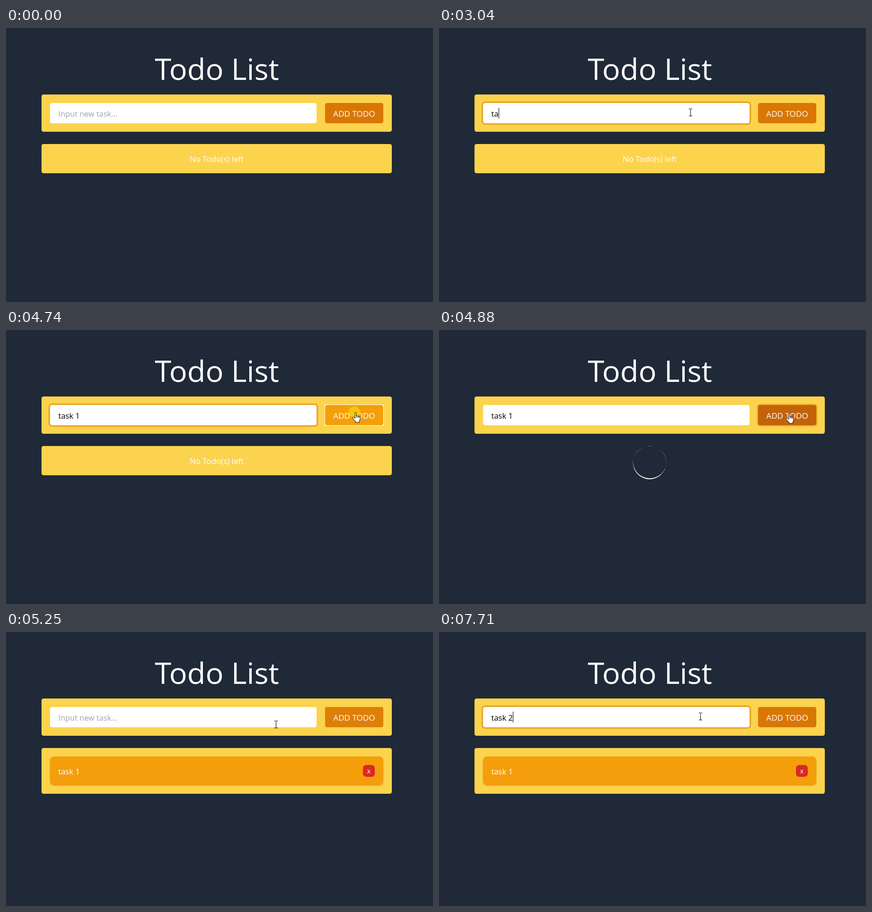
Write an HTML page with a canvas that moves like this. It is 902 by 581 pixels and loops after 8000 ms.

```html
<!DOCTYPE html>
<html lang="en">
<head>
<meta charset="utf-8">
<title>Todo List</title>
<style>
  html, body { margin: 0; width: 902px; height: 581px; overflow: hidden; background: #1f2937; }
  canvas { display: block; }
</style>
</head>
<body>
<canvas id="stage" width="902" height="581"></canvas>
<script>
const ctx = document.getElementById('stage').getContext('2d');
const LOOP = 8000;
const FOCUS = 1370, PRESS = 4735, RELEASE = 4845, LOADED = 5050, REFOCUS = 5660;
const HOVER = 4532, LEAVE = 5172;
const FIRST_KEYS = [2840, 3040, 3110, 3280, 3480, 3950];
const SECOND_KEYS = [6540, 6840, 6910, 7080, 7380, 7710];
const CARET_ON = [[FOCUS, 1910], [2440, 4450], [REFOCUS, 6170], [6540, LOOP]];
const CLICKS = [[FOCUS, 1480], [PRESS, RELEASE], [REFOCUS, 5755]];

// [time, x, y] of the pointer hotspot
const POINTER = [
  [160, 833, 566], [250, 800, 500], [360, 780, 462], [590, 780, 462],
  [760, 650, 375], [900, 528, 298], [980, 499, 232], [1040, 512, 190],
  [1100, 531, 179], [4280, 531, 179], [4480, 640, 176], [4600, 718, 172],
  [4720, 736, 174], [4845, 736, 174], [4880, 737, 176], [5110, 737, 176],
  [5180, 668, 191], [5250, 570, 196], [5330, 553, 192], [5500, 552, 179]
];

const INPUT = [93, 159, 563, 43], BUTTON = [674, 159, 123, 43];
const ARROW = new Path2D('M.5 .5V16.5L4.2 13L6.8 18.5L9 17.5L6.5 12H11.7Z');
const HAND = new Path2D('M1 13V2a1.5 1.5 0 0 1 3 0V8q1.5-1 3 .5q1.6-.8 2.6.7q2-.4 2.4 1.3V15q0 2-1.5 4V22H2.5V20Q-1 16.5-4 12.5Q-4.5 10.5-2.5 10.5Q-1 11 1 13.5Z');
const KNUCKLES = new Path2D('M4 8v4M7 8.5v3.5M9.6 9.2v3');

const within = (t, [from, to]) => t >= from && t < to;
const inside = (x, y, [left, top, w, h]) => x >= left && x < left + w && y >= top && y < top + h;

// cubic-bezier(.4, 0, .2, 1) over 150 ms
function fade(t, start) {
  const p = Math.min(1, Math.max(0, (t - start) / 150));
  let lo = 0, hi = 1;
  for (let i = 0; i < 16; i++) {
    const u = (lo + hi) / 2, v = 1 - u;
    if (1.2 * v * v * u + .6 * v * u * u + u ** 3 < p) lo = u; else hi = u;
  }
  return p === 0 ? 0 : p === 1 ? 1 : lo * lo * (3 - 2 * lo);
}

function box([x, y, w, h], color, radius = 4.4) {
  ctx.fillStyle = color;
  ctx.beginPath();
  ctx.roundRect(x, y, w, h, radius);
  ctx.fill();
}

function ring([x, y, w, h], amount) {
  const s = 3.3 * amount;
  if (s > 0) box([x - s, y - s, w + 2 * s, h + 2 * s], `rgba(217,119,6,${.5 * amount})`, 4.4 + s);
}

function text(str, x, y, size, color = '#fff', align = 'center') {
  ctx.font = `${size}px "Open Sans", "Noto Sans", sans-serif`;
  ctx.textAlign = align;
  ctx.fillStyle = color;
  ctx.fillText(str, x, y);
}

function buttonColor(t) {
  const steps = [[HOVER, [245, 158, 11]], [PRESS, [180, 83, 9]], [RELEASE, [245, 158, 11]], [LEAVE, [217, 119, 6]]];
  const mixed = steps.reduce((color, [start, to]) => {
    const f = fade(t, start);
    return color.map((v, i) => v + (to[i] - v) * f);
  }, [217, 119, 6]);
  return `rgb(${mixed.map(Math.round)})`;
}

function drawForm(t) {
  box([75, 141, 740, 79], '#fcd34d');
  ring(INPUT, fade(t, FOCUS) - fade(t, PRESS) + fade(t, REFOCUS));
  box(INPUT, '#fff');

  const [task, keys] = t < LOADED ? ['task 1', FIRST_KEYS] : ['task 2', SECOND_KEYS];
  const value = task.slice(0, keys.filter(k => t >= k).length);
  if (value) text(value, 110.6, 188, 16.5, '#000', 'left');
  else text('Input new task...', 110.6, 188, 16.35, '#9ca3af', 'left');
  if (CARET_ON.some(span => within(t, span))) {
    ctx.font = '16.5px "Open Sans", "Noto Sans", sans-serif';
    ctx.fillStyle = '#000';
    ctx.fillRect(Math.round(110.6 + ctx.measureText(value).width), 169, 1, 23);
  }

  if (within(t, [PRESS, PRESS + 30])) box([673, 158, 125, 45], '#fff', 2);
  else ring(BUTTON, fade(t, PRESS) - fade(t, RELEASE));
  box(BUTTON, buttonColor(t));
  text('ADD TODO', 735.5, 188, 17.1);
}

function drawSpinner(t) {
  ctx.save();
  ctx.translate(444.8, 281.2);
  ctx.rotate((t - RELEASE) / 1000 * 2 * Math.PI);
  ctx.fillStyle = '#fff';
  ctx.beginPath();
  ctx.arc(0, 0, 35.2, 0, 2 * Math.PI);
  ctx.ellipse(0, -1, 35.2, 34.2, 0, 0, 2 * Math.PI);
  ctx.fill('evenodd');
  ctx.restore();
}

function drawList(t) {
  if (t < RELEASE) {
    box([75, 246, 740, 62], '#fcd34d');
    text('No Todo(s) left', 445, 284, 16.9);
  } else if (t < LOADED) {
    drawSpinner(t);
  } else {
    box([75, 246, 740, 97], '#fcd34d');
    ctx.save();
    ctx.shadowColor = 'rgba(0,0,0,.2)';
    ctx.shadowBlur = 3;
    ctx.shadowOffsetY = 1;
    box([93, 264, 704, 61], '#f59e0b', 8.8);
    ctx.restore();
    text('task 1', 110.6, 302, 16.5, '#fff', 'left');
    box([754, 282, 25, 25], '#dc2626', 6.6);
    text('x', 766.5, 300, 14);
  }
}

function pointerAt(t) {
  const next = POINTER.findIndex(([time]) => time > t);
  if (next < 0) return POINTER[POINTER.length - 1].slice(1);
  const [t0, x0, y0] = POINTER[next - 1], [t1, x1, y1] = POINTER[next];
  const f = (t - t0) / (t1 - t0);
  return [Math.round(x0 + (x1 - x0) * f), Math.round(y0 + (y1 - y0) * f)];
}

function drawPointer(t) {
  if (t < POINTER[0][0]) return;
  const [x, y] = pointerAt(t);
  ctx.save();
  ctx.translate(x, y);
  if (CLICKS.some(span => within(t, span))) {
    ctx.fillStyle = 'rgba(244,212,12,.75)';
    ctx.beginPath();
    ctx.arc(0, 0, 12, 0, 2 * Math.PI);
    ctx.fill();
  }
  if (inside(x, y, INPUT)) {
    ctx.fillStyle = '#000';
    ctx.fillRect(0, -7, 1, 15);
    for (const edge of [-8, 7]) {
      ctx.fillRect(-3, edge, 3, 1);
      ctx.fillRect(1, edge, 3, 1);
    }
  } else {
    const hand = inside(x, y, BUTTON), shape = hand ? HAND : ARROW;
    ctx.fillStyle = '#fff';
    ctx.strokeStyle = '#000';
    ctx.lineWidth = 1;
    ctx.fill(shape);
    ctx.stroke(shape);
    if (hand) ctx.stroke(KNUCKLES);
  }
  ctx.restore();
}

function draw(now) {
  const t = now % LOOP;
  ctx.fillStyle = '#1f2937';
  ctx.fillRect(0, 0, 902, 581);
  text('Todo List', 445.5, 110, 63);
  drawForm(t);
  drawList(t);
  drawPointer(t);
}

const begin = performance.now();
function tick() {
  draw(performance.now() - begin);
  requestAnimationFrame(tick);
}
tick();
</script>
</body>
</html>
```
